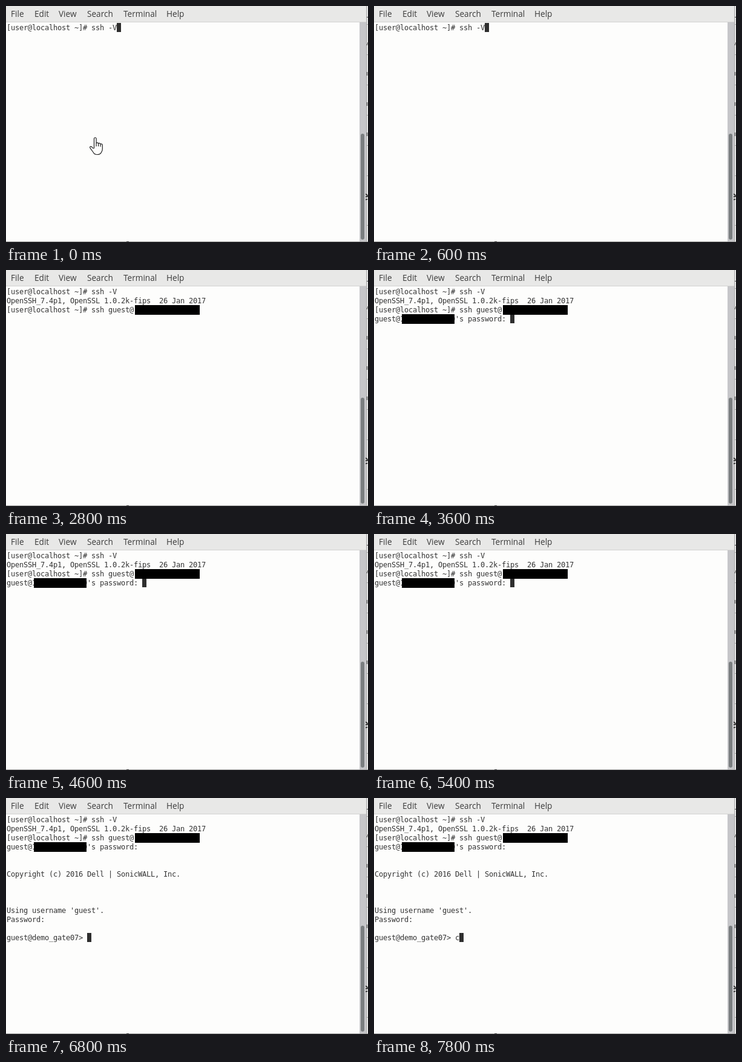
An HTML page for the animation above (8 s loop, 598 by 390 pixels).

```html
<!DOCTYPE html>
<html lang="en">
<head>
<meta charset="utf-8">
<title>Terminal session</title>
<style>
html, body { margin: 0; width: 100%; height: 100%; overflow: hidden; }
#stage {
  position: relative; width: 598px; height: 390px; overflow: hidden;
  background: #fdfdfc; color: #333;
}
#stage > * { position: absolute; }
#menu { left: 0; top: 0; width: 596px; height: 26px; background: #e8e8e7; border-bottom: 1px solid #d2d2d1; }
#menu span { position: absolute; top: 3px; font: 13.6px/20px "Open Sans", "Noto Sans", sans-serif; color: #3c3c3c; }
#screen {
  left: 1px; top: 29px; margin: 0;
  font: 12px/15px "DejaVu Sans Mono", monospace;
  letter-spacing: calc(7px - 0.602em); /* 7px character grid */
  font-variant-ligatures: none;
}
#cursor { width: 7px; height: 15px; background: #2e2e2e; }
.mask { background: #000; height: 16px; }
#track { left: 584px; top: 27px; width: 11px; height: 362px; background: #c6c6c9; }
#thumb { left: 586px; top: 211px; width: 6px; height: 175px; border-radius: 3px; background: #7a7e80; }
#behind, #hand { left: 0; top: 0; }
</style>
</head>
<body>
<div id="stage">
  <div id="menu"></div>
  <pre id="screen"></pre>
  <div id="cursor"></div>
  <div class="mask" id="hostMask" style="left:213px;top:58px;width:107px"></div>
  <div class="mask" id="loginMask" style="left:46px;top:73px;width:87px"></div>
  <div id="track"></div>
  <div id="thumb"></div>
  <svg id="behind" width="598" height="390">
    <path d="M595 0h3v390h-3z" fill="#e6e6e6"/>
    <path d="M595.5 0V390" stroke="#a8a8a8"/>
    <path d="M0 389.5H598" stroke="#a0a0a0"/>
    <path d="M596 30.5h2m-2 50h2m-2 50h2m-2 50h2m-2 50h2m-2 50h2m-2 82h2" stroke="#a8a8a8"/>
    <path d="M596 18.5h2M596 65l2-5M596.5 109v6M596.5 159v6M596.5 209v6" fill="none" stroke="#484848"/>
    <path d="M594 311q3 0 3 4h-3m0 5q2 0 3-1" fill="none" stroke="#222" stroke-width="1.6"/>
    <path d="M199 389.5h4" stroke="#292929"/>
  </svg>
  <svg id="hand" width="598" height="390">
    <path d="M145.5 235V219.5q0-2 1.8-2t1.8 2V227.5q0-1.6 1.7-1.6t1.8 1.8q.2-1.1 1.7-1t1.8 1.9q.3-1 1.6-.8t1.6 2V236q0 3-1.5 5.2-1.8 4.3-7.3 4.3-4.5 0-6.2-3.5l-5.2-7.2q-1.2-2 .5-2.6 2-.5 3.9 2.8zM149.1 227.5V232M152.6 228v4M156.1 229v3.5"
      fill="#fdfdfc" stroke="#222" stroke-width="1.2" stroke-linejoin="round"/>
  </svg>
</div>
<script>
const LOOP = 8000;
const $ = id => document.getElementById(id);

const MENU = { File: 8, Edit: 47, View: 87, Search: 134, Terminal: 194, Help: 265 };
for (const [label, x] of Object.entries(MENU)) {
  const item = document.createElement("span");
  item.textContent = label;
  item.style.left = x + "px";
  $("menu").append(item);
}

const PROMPT = "[user@localhost ~]# ";
const VERSION = [PROMPT + "ssh -V", "OpenSSH_7.4p1, OpenSSL 1.0.2k-fips  26 Jan 2017"];
const CONNECT = [...VERSION, PROMPT + "ssh guest@"];
const LOGIN = [...CONNECT, "guest@1" + " ".repeat(11) + "0's password: "];
const BANNER = [...LOGIN, "", "", "Copyright (c) 2016 Dell | SonicWALL, Inc.", "", "", "",
  "Using username 'guest'.", "Password:", ""];
const SHELL = "guest@demo_gate07> ";

// start time, lines on screen
const TEXT = [
  [0, [PROMPT + "ssh -V"]],
  [1400, [...VERSION, PROMPT]],
  [2600, CONNECT],
  [3400, LOGIN],
  [6600, [...BANNER, SHELL]],
  [7800, [...BANNER, SHELL + "c"]],
];
// start time, cursor visible
const BLINK = [
  [0, true], [400, false], [600, true], [2000, false], [3400, true],
  [4000, false], [4600, true], [5200, false], [5400, true],
  [7400, false], [7800, true],
];

const at = (steps, t) => steps.findLast(([start]) => start <= t)[1];
const show = (id, on) => { $(id).style.visibility = on ? "visible" : "hidden"; };

let drawn;
function draw(t) {
  const lines = at(TEXT, t);
  if (lines !== drawn) {
    $("screen").textContent = lines.join("\n");
    const row = lines.length - 1;
    $("cursor").style.left = 1 + 7 * lines[row].length + "px";
    $("cursor").style.top = 28 + 15 * row + "px";
    drawn = lines;
  }
  show("cursor", at(BLINK, t));
  show("hand", t < 200);
  show("hostMask", t >= 2600);
  show("loginMask", t >= 3400);
}

const origin = performance.now();
function tick() {
  draw((performance.now() - origin) % LOOP);
  requestAnimationFrame(tick);
}
tick();
</script>
</body>
</html>
```
